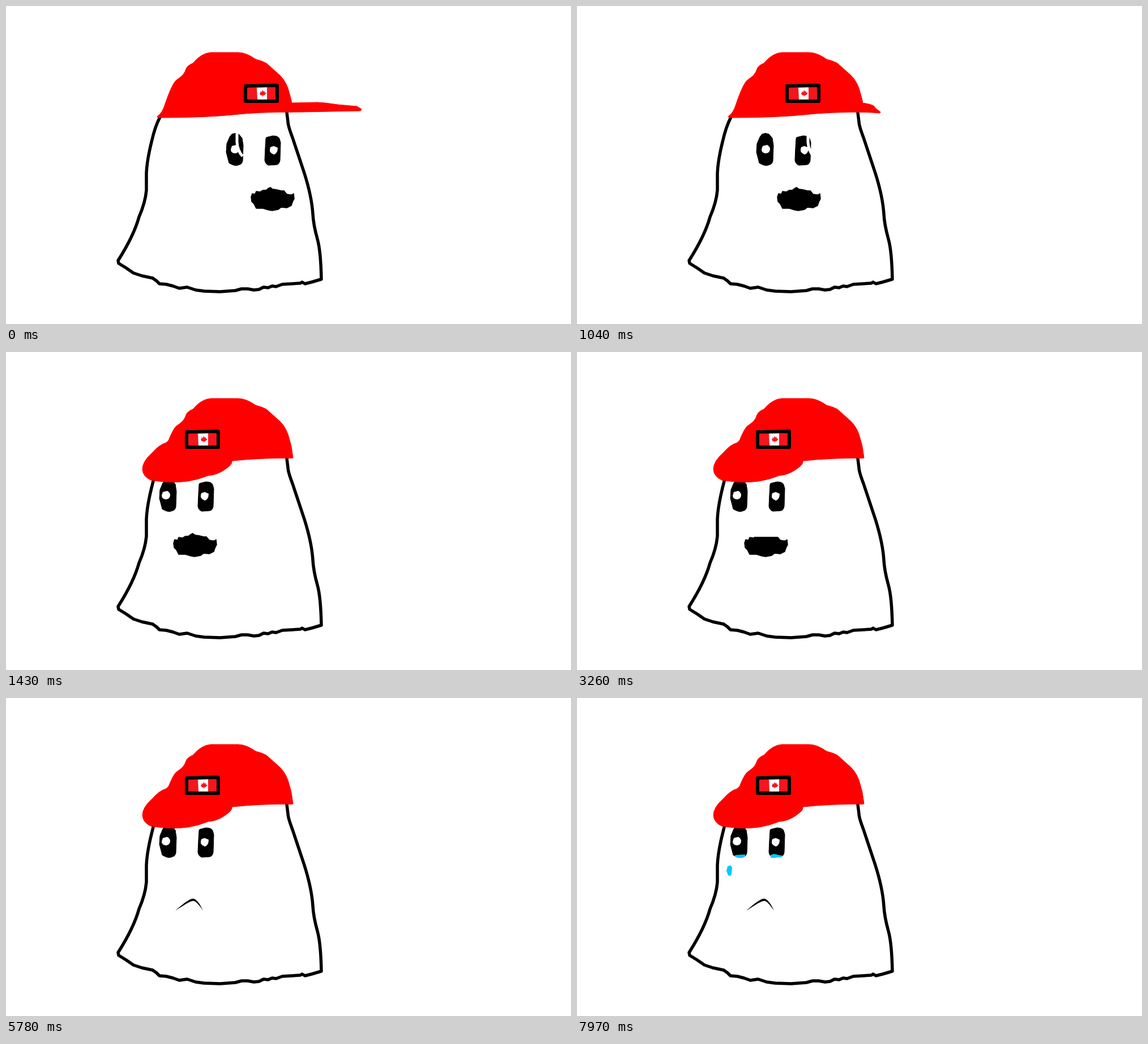
An HTML page without scripts for the animation above (8000 ms loop, 998 by 561 pixels).

```html
<!DOCTYPE html>
<html lang="en">
<head>
<meta charset="utf-8">
<title>Ghost in a red cap</title>
<style>
  html, body { margin: 0; width: 100%; height: 100%; overflow: hidden; background: #fff; }
  svg { display: block; width: 100vw; height: 100vh; }
  .slide, .wipe, .mouth, .peak, .brim, .pool, .drop {
    animation: slide 8s -4ms infinite;
  }

  /* turn of the head: each part has its own four positions */
  .eyes   { --a: 28px; --b: 0px; --c: -44px; --d: -90px; }
  .pupils { --a: 27px; --b: 0px; --c: -44px; --d: -95px; }
  .flag   { --a: 24px; --b: 0px; --c: -28px; --d: -80px; }
  .blob   { --a: 34px; --b: 0px; --c: -45px; --d: -103px; }
  @keyframes slide {
    0% { transform: translateX(var(--a)); }
    6.25% { transform: translateX(var(--a)); animation-timing-function: steps(9, start); }
    9.625% { transform: translateX(var(--b)); animation-timing-function: steps(10, start); }
    13.375% { transform: translateX(var(--c)); animation-timing-function: steps(13, start); }
    18.25%, 100% { transform: translateX(var(--d)); }
  }

  /* side peak of the cap shortens, then the front brim swings round */
  .peak { animation-name: peak; }
  @keyframes peak {
    0%, 6.25% {
      d: path("M502 171L550 170L564 171L586 174L620 177L628 182L626 185L520 187L498 187Z");
      animation-timing-function: steps(9, start);
    }
    9.625% {
      d: path("M502 173L525 173L541 176L575 175L585 178L591 184L588 188L520 190L498 188Z");
      animation-timing-function: steps(10, start);
    }
    13.375% {
      d: path("M502 171L511 172L519 174L524 176L528 181L536 187L535 189L522 188L498 187Z");
      animation-timing-function: steps(3, start);
    }
    14.5%, 100% {
      d: path("M500 171L502 172L503 174L504 176L505 181L506 186L505 187L504 187L498 187Z");
    }
  }
  .brim { animation-name: brim; }
  @keyframes brim {
    0%, 14.5% { transform: translate(105px, -38px); visibility: hidden; animation-timing-function: steps(5, start); }
    16.375% { transform: translate(-5px, -4px); animation-timing-function: steps(2, start); }
    17.125% { transform: translate(-13px, 0); animation-timing-function: steps(3, start); }
    16.375%, 100% { visibility: visible; }
    18.25%, 100% { transform: none; }
  }

  /* open mouth is wiped from above, then a smile bends to a frown */
  .wipe { animation-name: wipe; }
  @keyframes wipe {
    0% { visibility: hidden; animation-timing-function: step-end; }
    0%, 40.75% {
      d: path("M285 314L388 314L388 326Q334 326 285 326Z");
      animation-timing-function: steps(7, end);
    }
    40.75% { visibility: visible; }
    43.375%, 100% {
      d: path("M285 314L388 314L388 318Q334 396 285 318Z");
      visibility: visible;
    }
  }
  .fade { animation: fade 8s -4ms step-end infinite; }
  @keyframes fade {
    0% { visibility: visible; }
    43.375%, 100% { visibility: hidden; }
  }
  .mouth { animation-name: mouth; }
  @keyframes mouth {
    0% { visibility: hidden; animation-timing-function: step-end; }
    43.375% { visibility: visible; }
    0%, 66.25% {
      d: path("M291 320C306 345 322 357 337 357C352 357 368 345 383 320C370 350 354 362 337 362C320 362 304 350 291 320Z");
    }
    66.25% { animation-timing-function: steps(17, start); }
    72.625%, 100% {
      d: path("M299 375C312 364 325 353 331 354C337 355 343 364 348 375C341 365 335 358 331 358C326 357 314 366 299 375Z");
    }
    100% { visibility: visible; }
  }

  /* tears */
  .pool, .drop { transform-box: fill-box; }
  .pool { animation-name: pool; transform-origin: left; }
  .drop { animation-name: drop; transform-origin: center; }
  @keyframes pool {
    0%, 95.5% { transform: scaleX(0); animation-timing-function: steps(5, start); }
    97.375%, 100% { transform: none; }
  }
  @keyframes drop {
    0%, 97.375% { transform: translate(9px, -17px) scale(0); animation-timing-function: steps(7, start); }
    100% { transform: none; }
  }
</style>
</head>
<body>
<svg viewBox="0 0 998 561" xmlns="http://www.w3.org/2000/svg" stroke-linejoin="round">
  <path fill="none" stroke="#000" stroke-width="5.5" stroke-linecap="round"
    d="M272 196Q263 213 257 240Q249 272 248 295L248 325Q246 347 235 372Q226 405 198 449L199 454L212 462L225 471L240 476L259 480L266 485L271 490L283 491L295 494L306 498L320 496L335 501L350 503L378 504L405 502L416 499L427 499L438 501L447 500L455 496L463 497L470 494L477 495L488 491L505 490L520 489L523 487L528 490L540 487L557 482Q556 432 550 411Q543 386 542 367Q540 336 527 295L506 232Q498 211 498 204L496 188"/>

  <g class="slide eyes" stroke="#000">
    <path d="M371 226Q377 223 383 226L389 233L391 246L390 273Q389 279 384 280Q377 284 366 277L361 258L362 243L367 231Z"/>
    <path d="M431 234Q431 231 435 231L443 229Q453 229 455 234L457 241L456 272Q455 279 450 280L436 281Q430 279 429 272L430 250Z"/>
  </g>
  <g class="slide pupils" fill="#fff">
    <path d="M372 247L380 245Q385 248 385 253Q384 260 377 260Q370 259 370 253Z"/>
    <path d="M440 249L446 247L453 250Q453 260 446 262Q438 259 439 253Z"/>
  </g>
  <path d="M408 221V240Q409 256 418 265" fill="none" stroke="#fff" stroke-width="5"/>

  <g class="fade">
    <path class="slide blob" stroke="#000" stroke-width="1.5"
      d="M399 337L401 331L406 332L408 327L415 328L420 325L425 325L429 322L433 320L437 323L444 324L452 326L457 326L462 332L468 333L471 333L474 331L475 340L472 346L470 352L462 356L452 355L447 359L436 361L430 360L420 357L408 357L404 349L400 345Z"/>
  </g>
  <path class="wipe" fill="#fff"/>
  <path class="mouth"/>

  <g fill="#00c8ff">
    <path class="pool" d="M279 277L297 276L297 279L293 282L284 282L280 280Z"/>
    <path class="pool" d="M342 277L348 275L356 277L363 278L361 281L342 282Z"/>
    <path class="drop" d="M266 297L271 295L274 299L273 310L271 314L267 313L264 305Z"/>
  </g>

  <g fill="#f00" stroke="#f00">
    <path d="M268 194Q276 189 281 173Q289 149 296 137Q299 131 306 127Q315 121 318 111Q320 105 330 101Q345 83 362 82L410 82Q424 82 441 94Q453 97 460 101L478 117Q492 128 498 145Q505 165 507 187Q445 187 400 192Q348 197 271 197Q266 197 268 194Z"/>
    <path class="peak"/>
    <path class="brim" d="M283 160Q271 163 258 178Q241 193 241 207Q242 220 256 226Q290 232 321 228Q340 225 357 218Q373 217 387 207Q399 199 399 194L398 189L330 150L291 152Z"/>
  </g>

  <g class="slide flag">
    <path fill="#f4161c" d="M399 141H455V169H399Z"/>
    <path fill="#fff" d="M419 144L437 143L437 165L420 165Z"/>
    <path fill="#f4161c" d="M429 148L431 151L433 150L433 153L436 153L433 157L430 158L430 161L429 158L425 157L424 153L426 153L425 150L428 152Z"/>
    <path fill="none" stroke="#000" stroke-width="6" d="M399 141L455 140L455 168L399 168Z"/>
  </g>
</svg>
</body>
</html>
```
